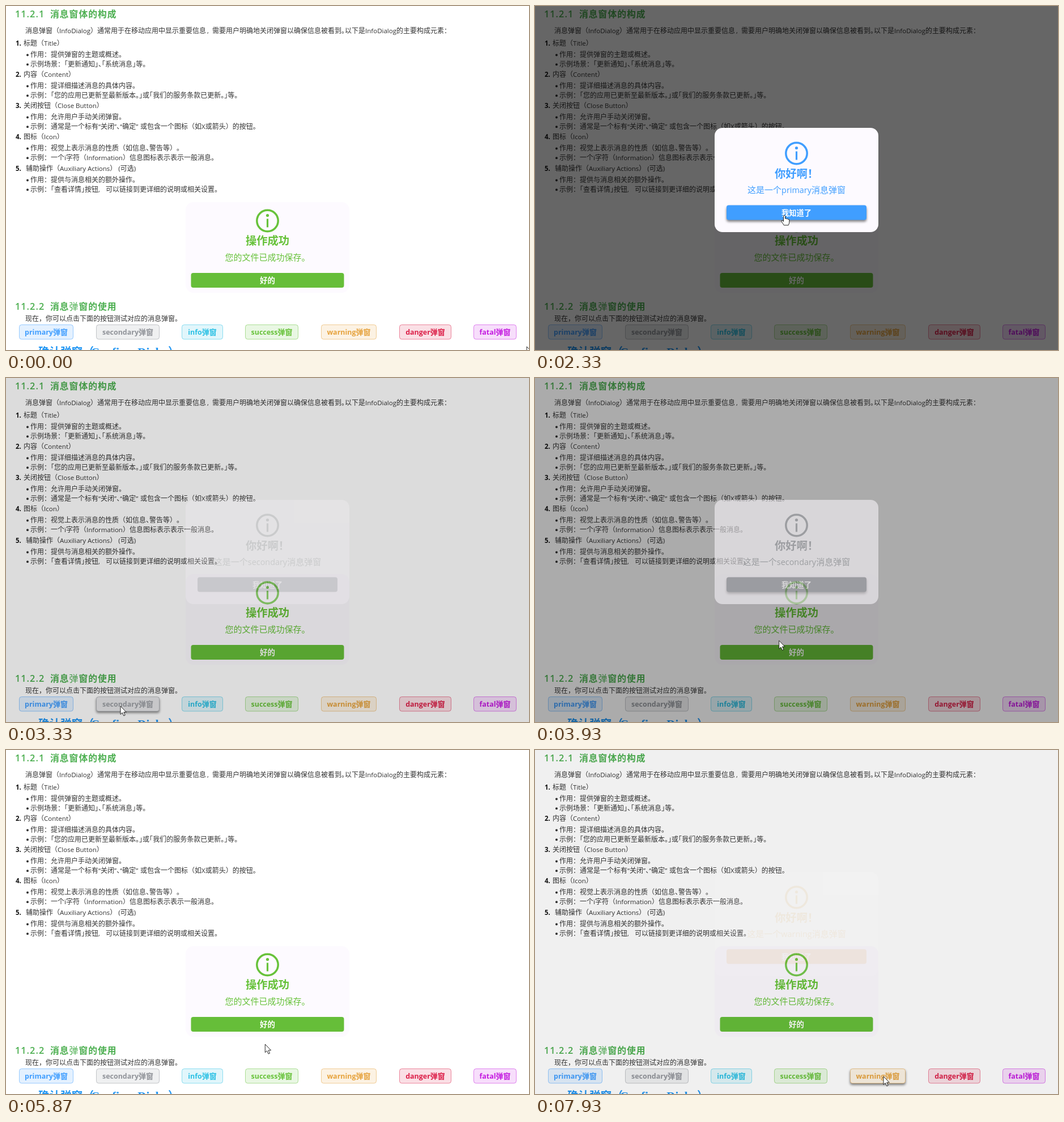
Write an HTML page that moves like this. It is 923 by 607 pixels and loops after 8000 ms.

```html
<!DOCTYPE html>
<html lang="zh-CN">
<head>
<meta charset="utf-8">
<title>InfoDialog</title>
<style>
html, body { margin: 0; width: 100%; height: 100%; overflow: hidden; background: #fff; }
svg { display: block; width: 100%; height: 100%; }
text {
  font-family: "Noto Sans CJK SC", "Noto Sans CJK", sans-serif;
  white-space: pre; text-spacing-trim: space-all;
}
.latin { font-family: "Open Sans", sans-serif; font-size: .96em; }
.half { font-feature-settings: "halt"; }
.centred { font-family: "Noto Sans CJK TC", "Noto Sans CJK", sans-serif; }
.serif { font-family: "Liberation Serif", serif; }
</style>
</head>
<body>
<svg id="stage" viewBox="0 0 923 607" xmlns="http://www.w3.org/2000/svg"></svg>
<script>
const LOOP = 8000, FADE = 300, HOVER = 250;
const GREEN = '#67c23a', INK = '#333';
const stage = document.getElementById('stage');

// Wraps Latin runs, half-width punctuation and centred punctuation in their own spans.
function runs(s, centred) {
  const span = (cls, m) => `<tspan class="${cls}">${m}</tspan>`;
  return s.replace(/[\x20-\x7e“”]+|[「」、]|。(?=」)|[（），。：！]/g, m => {
    if (/^[\x20-\x7e“”]/.test(m)) return span('latin', m);
    if (/[「」、]/.test(m)) return span('half', m);
    if (m === '：' || centred) return span('centred', m);
    return m;
  }).replace(/。(?=<tspan class="half">」)/g, m => span('half', m));
}

function text(x, mid, s, o = {}) {
  const { size = 12, fill = INK, weight = 400, anchor = 'start', centred, extra = '' } = o;
  return `<text x="${x}" y="${mid + size * .37}" font-size="${size}" fill="${fill}" ` +
    `font-weight="${weight}" text-anchor="${anchor}" ${extra}>${runs(s, centred)}</text>`;
}

const rect = (x, y, w, h, r, fill, extra = '') =>
  `<rect x="${x}" y="${y}" width="${w}" height="${h}" rx="${r}" fill="${fill}" ${extra}/>`;

const icon = (y, color) =>
  `<g fill="none" stroke="${color}" stroke-width="3.5"><circle cx="461.5" cy="${y}" r="18.7"/>` +
  `<path d="M461.5 ${y - 3.5}v15" stroke-width="3.2"/></g>` +
  `<circle cx="461.5" cy="${y - 9.5}" r="2.6" fill="${color}"/>`;

const shadow = (x, y, w, h, cls) =>
  rect(x, y + 3, w, h, 4, '#000', `class="${cls}" opacity="0" filter="url(#soft)"`);

const middle = (y, s, size, fill, weight, centred) =>
  text(461.5, y, s, { size, fill, weight, anchor: 'middle', centred });

function heading(y, number, title) {
  return text(16, y, number, { size: 17, fill: '#4caf50', weight: 600, extra: 'letter-spacing="1"' }) +
    text(78, y, title, { size: 15.8, fill: '#4caf50', weight: 700, extra: 'letter-spacing="1"' })
      .replace('弹', '<tspan font-weight="400">弹</tspan>');
}

const items = [
  [66, 31, '标题（Title）', true, '作用：提供弹窗的主题或概述。', '示例场景：「更新通知」、「系统消息」等。'],
  [121, 31, '内容（Content）', false, '作用：提详细描述消息的具体内容。', '示例：「您的应用已更新至最新版本。」或「我们的服务条款已更新。」等。'],
  [176, 31, '关闭按钮（Close Button）', false, '作用：允许用户手动关闭弹窗。', '示例：通常是一个标有“关闭”、“确定”'],
  [231, 31, '图标（Icon）', true, '作用：视觉上表示消息的性质（如信息、警告等）。', '示例：一个i字符（Information）信息图标表示表示一般消息。'],
  [287, 35, '辅助操作（Auxiliary Actions） (可选)', true, '作用：提供与消息相关的额外操作。', '示例：「查看详情」按钮,']
];

function page() {
  let s = heading(14, '11.2.1', '消息窗体的构成');
  s += text(34, 44, '消息弹窗（InfoDialog）通常用于在移动应用中显示重要信息');
  s += text(355, 44, ',') + text(364, 44, '需要用户明确地关闭弹窗以确保信息被看到。');
  s += text(598, 44, '以下是InfoDialog的主要构成元素：');
  items.forEach(([y, x, title, centred, use, example], i) => {
    s += text(17, y, `${i + 1}.`, { weight: 700, fill: '#111' }) + text(x, y, title, { centred });
    [use, example].forEach((line, k) => {
      const ly = y + 19.5 + 16.7 * k;
      s += `<circle cx="38" cy="${ly + 1}" r="2" fill="${INK}"/>` + text(43, ly, line);
    });
  });
  s += text(237, 212.2, '或包含一个图标（如X或箭头）的按钮。');
  s += text(176, 323.2, '可以链接到更详细的说明或相关设置。');
  s += rect(317, 346, 289, 160, 14, '#fdfaff') + icon(379, GREEN);
  s += middle(414, '操作成功', 19.3, GREEN, 700) + middle(443, '您的文件已成功保存。', 15, GREEN, 400);
  s += rect(326.5, 471, 270, 26, 4, '#66be39') + middle(484, '好的', 13.4, '#fff', 700);
  s += heading(530, '11.2.2', '消息弹窗的使用');
  s += text(34, 552, '现在，你可以点击下面的按钮测试对应的消息弹窗。', { centred: true });
  const blue = { size: 19.6, fill: '#2196f3', weight: 700, centred: true };
  s += text(57, 610, '确认弹窗（', blue) + text(286, 610, '）', blue);
  s += '<text x="150" y="617.5" font-size="21" font-weight="700" fill="#2196f3"><tspan class="serif">Confirm Dialog</tspan></text>';
  return s;
}

const buttons = [
  ['primary', 23, 118, '#409eff'], ['secondary', 159, 270, '#909399'],
  ['info', 310, 382, '#2bc0e4'], ['success', 422, 515, '#67c23a'],
  ['warning', 556, 653, '#e6a23c'], ['danger', 694, 785, '#dc1f48'],
  ['fatal', 825, 900, '#c41be0']
].map(([name, x0, x1, color]) => ({ name, x0, x1, color }));

const drawButton = ({ name, x0, x1, color }) => {
  const box = (fill, extra) => rect(x0 + .5, 562.5, x1 - x0, 25.5, 4, fill, extra);
  return `<g id="${name}">` + shadow(x0, 562, x1 - x0 + 1, 26, 'shade') + box('#fff') +
    box(color, `fill-opacity=".14" stroke="${color}" stroke-opacity=".5"`) +
    box(color, 'class="fill" opacity="0"') +
    text((x0 + x1 + 1) / 2, 575.5, name + '弹窗', { size: 13, fill: color, weight: 700, anchor: 'middle', extra: 'class="label"' }) +
    '</g>';
};

const drawDialog = ({ name, color }) =>
  rect(317, 215, 289, 184, 14, '#fdfaff') + icon(260, color) +
  middle(296, '你好啊！', 19.3, color, 700, true) +
  middle(324, `这是一个${name}消息弹窗`, 15, color, 400) +
  shadow(338, 351.5, 247, 26, 'shade') +
  rect(338, 351.5, 247, 26, 4, color) + middle(365, '我知道了', 13.3, '#fff', 700);

stage.innerHTML =
  '<defs><filter id="soft" x="-20%" y="-60%" width="140%" height="220%"><feGaussianBlur stdDeviation="2.2"/></filter></defs>' +
  page() + buttons.map(drawButton).join('') +
  rect(0, 0, 923, 607, 0, '#000', 'id="veil"') + '<g id="dialog"></g>' +
  '<g id="mouse" stroke="#111" stroke-width=".9" stroke-linejoin="round" fill="#fff">' +
  '<path id="arrow" d="M0 0V14.5L3.3 11.6 5.8 17 8.2 16 5.8 10.7H10.3Z"/>' +
  '<path id="hand" d="M-1.5 1.2Q0-.8 1.5 1.2V6.2Q3.2 5 4.2 6.8 5.8 5.8 6.7 7.4 8.6 6.6 8.8 9V12.5Q8.6 15 7.2 17.8H-.8Q-2.5 14.5-5 11.4-5.6 9.2-3.6 9.4L-1.5 11.2Z"/></g>';

// Each dialog: which button opens it, press, fade-in, fade-out, and until when the hand stays.
const shows = [
  { b: 0, press: 1040, open: 1305, close: 2430, hand: 1500 },
  { b: 1, press: 3130, open: 3280, close: 3850, hand: 3280 },
  { b: 2, press: 4660, open: 4937, close: 5530, hand: 4937 },
  { b: 3, press: 6060, open: 6300, close: 7060, hand: 6300 },
  { b: 4, press: 7640, open: 7900, close: 1e6, hand: 7900 }
];

// Pointer moves: start, end, target.
const moves = [
  [30, 530, 440, 573], [640, 950, 96, 576], [1640, 2040, 440, 369], [2480, 2860, 202, 579],
  [3400, 3680, 500, 370], [3830, 4040, 353, 568], [5120, 5400, 450, 372],
  [5700, 5960, 460, 574], [6380, 6640, 470, 368], [7150, 7450, 615, 576]
];

const clamp = v => Math.max(0, Math.min(1, v));
const smooth = u => u * u * (3 - 2 * u);

// CSS "ease": cubic-bezier(.25, .1, .25, 1)
function ease(x) {
  x = clamp(x);
  const curve = (a, b, u) => 3 * a * u * (1 - u) ** 2 + 3 * b * u * u * (1 - u) + u ** 3;
  let lo = 0, hi = 1;
  for (let i = 0; i < 20; i++) {
    const mid = (lo + hi) / 2;
    if (curve(.25, .25, mid) < x) lo = mid; else hi = mid;
  }
  return curve(.1, 1, lo);
}

function pointer(t) {
  let x = 919, y = 601;
  for (const [a, b, tx, ty] of moves) {
    const k = smooth(clamp((t - a) / (b - a)));
    x += (tx - x) * k;
    y += (ty - y) * k;
  }
  return [x, y];
}

const showAt = t => shows.find(s => t >= s.open && t < s.close + FADE);
const level = (s, t) => !s ? 0 : t < s.close ? ease((t - s.open) / FADE) : 1 - ease((t - s.close) / FADE);

function over(t, x0, y0, x1, y1) {
  const [x, y] = pointer(t);
  return x >= x0 && x <= x1 && y >= y0 && y <= y1;
}

const overButton = (b, t) => over(t, b.x0, 562, b.x1, 589);
const overOk = t => over(t, 338, 351, 585, 378);
const pressed = (i, t) => shows.some(s => s.b === i && t >= s.press && t < s.close);
const covered = (t, lag) => shows.some(s => t >= s.open + lag && t < s.close + FADE);

// A transition as the share of the last moments in which the test held.
function recent(t, test) {
  let n = 0;
  for (let k = 0; k < 10; k++) n += test(t - k * HOVER / 10);
  return n / 10;
}

const byId = id => document.getElementById(id);
const veil = byId('veil'), dialog = byId('dialog'), mouse = byId('mouse');
const arrow = byId('arrow'), hand = byId('hand');
const parts = buttons.map(b => ['shade', 'fill', 'label'].map(c => byId(b.name).querySelector('.' + c)));
let drawn = null;

function render(t) {
  buttons.forEach((b, i) => {
    const [shade, fill, label] = parts[i];
    const f = recent(t, u => overButton(b, u) && !covered(u, 0) && !pressed(i, u));
    shade.setAttribute('opacity', .5 * recent(t, u => overButton(b, u) && !covered(u, 50)));
    fill.setAttribute('opacity', f);
    label.style.fill = `color-mix(in srgb, #fff ${f * 100}%, ${b.color})`;
  });

  const show = showAt(t), p = level(show, t);
  veil.setAttribute('opacity', .6 * p);
  dialog.setAttribute('opacity', p);
  if (show && show !== drawn) {
    dialog.innerHTML = drawDialog(buttons[show.b]);
    drawn = show;
  }
  if (show) {
    const held = recent(t, u => overOk(u) && u >= show.open && u < show.close);
    dialog.querySelector('.shade').setAttribute('opacity', .5 * held);
  }

  const [x, y] = pointer(t);
  mouse.setAttribute('transform', `translate(${x} ${y})`);
  const onButton = buttons.some(b => overButton(b, t)) && (!show || t < show.hand);
  const link = onButton || (show && t < show.close && overOk(t));
  hand.style.display = link ? '' : 'none';
  arrow.style.display = link ? 'none' : '';
}

const begin = performance.now();
function tick() {
  render((performance.now() - begin) % LOOP);
  requestAnimationFrame(tick);
}
tick();
</script>
</body>
</html>
```
